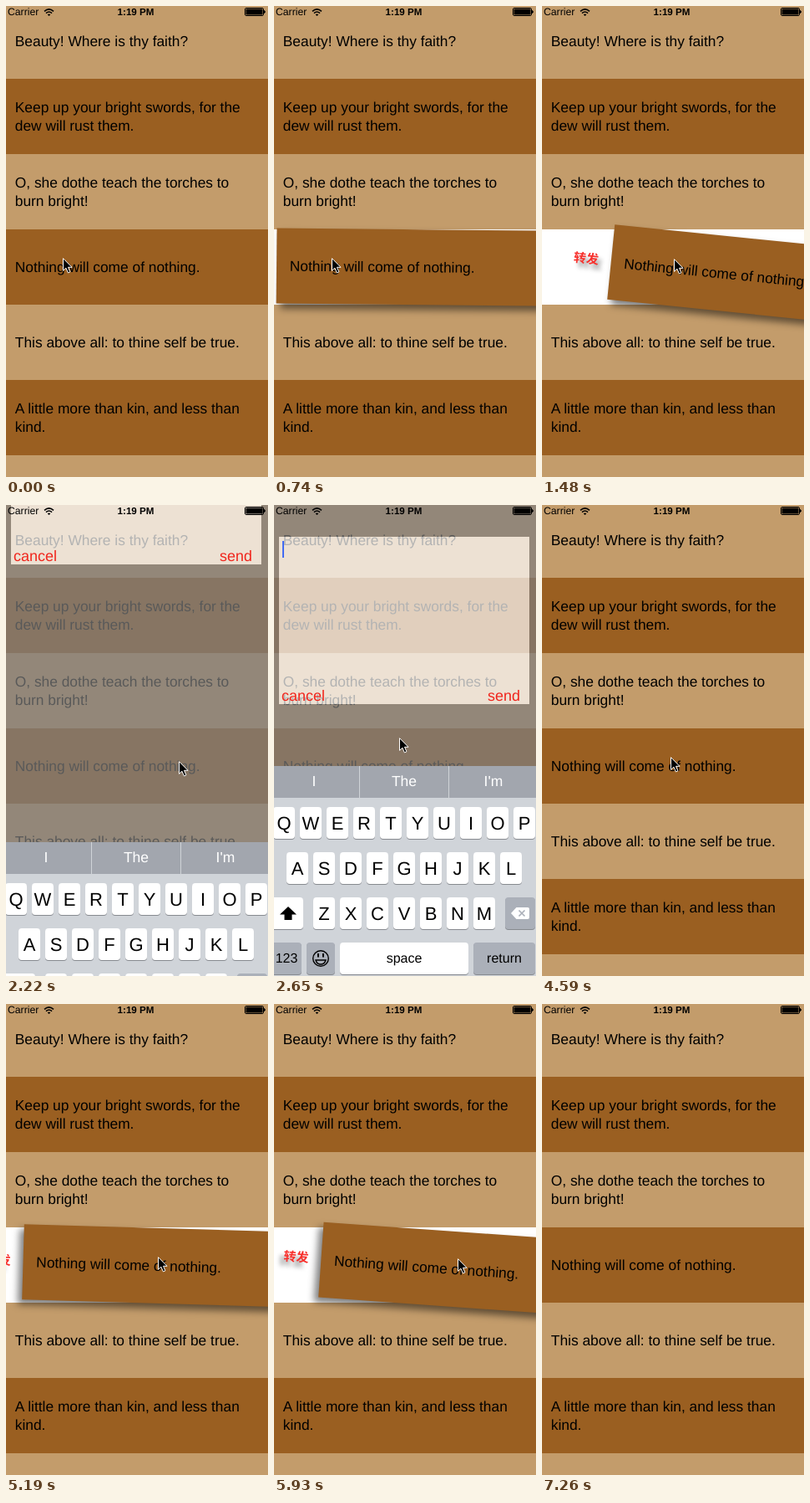
Write an HTML page that moves like this. It is 314 by 563 pixels and loops after 8.22 s.

```html
<!DOCTYPE html>
<html lang="en">
<head>
<meta charset="utf-8">
<title>Swipe a quote to share it</title>
<style>
html, body { margin: 0; width: 100%; height: 100%; overflow: hidden; background: #fff; }
#stage {
  position: relative; width: 314px; height: 563px; overflow: hidden; background: #fff;
  font-family: "Liberation Sans", Arial, sans-serif; color: #000;
  text-rendering: geometricPrecision;
}
#stage div, #stage svg { position: absolute; }
#stage svg { left: 0; top: 0; }
.row {
  left: -5px; width: 320px; height: 90px; box-sizing: border-box; padding-left: 15.8px;
  display: flex; align-items: center; font-size: 17.35px; line-height: 22px; white-space: pre;
  background: #c39c6b;
}
.row.dark { background: #9a5f21; }
#card { z-index: 1; }
#card.lifted { box-shadow: var(--lean) 6px 8px rgba(0, 0, 0, .5); }
#share {
  left: -45px; top: 33px; font: bold 15px/22px "Noto Sans CJK SC", "Noto Sans CJK", sans-serif;
  color: #f8302c; text-shadow: var(--lean) 6px 5px rgba(0, 0, 0, .35);
}
#panel { z-index: 2; left: 6px; top: 0; width: 300px; height: 200px; background: rgba(255, 255, 255, .7); }
#panel .button { bottom: 0; font-size: 18px; line-height: 20px; color: #f0251c; }
#caret { left: 4px; top: 5px; width: 2px; height: 20px; background: #426bf2; }
#keyboard { z-index: 3; left: 0; top: 0; width: 314px; height: 252px; background: #d0d4d9; }
#bar { left: 0; top: 0; width: 314px; height: 38px; background: #a2a6ae; }
.word { top: 0; width: 106px; height: 38px; line-height: 36px; font-size: 17.5px; color: #fff; text-align: center; }
.word + .word { border-left: 1px solid #d0d3d8; }
.key {
  height: 38px; line-height: 39px; border-radius: 4px; background: #fff; font-size: 22px;
  text-align: center; box-shadow: 0 1px 0 #878a8f;
}
.key.small { font-size: 16px; }
.key.gray { background: #abb0b9; }
#status { z-index: 4; left: 0; top: 0; width: 314px; height: 15px; font-size: 12.2px; line-height: 15px; }
#status div { top: 0; }
#status .time { left: 105px; width: 101px; text-align: center; font-weight: bold; font-size: 11.6px; }
#cursor { z-index: 5; overflow: visible; }
</style>
</head>
<body>
<div id="stage">
  <div id="panel">
    <div id="caret"></div>
    <div class="button" style="left:3px">cancel</div>
    <div class="button" style="left:250px">send</div>
  </div>
  <div id="keyboard"><div id="bar"></div></div>
  <div id="status">
    <div style="left:2px">Carrier</div>
    <div class="time">1:19 PM</div>
    <svg width="314" height="15" fill="none" stroke="#000">
      <path d="M46 6.3Q51.5 1.3 57 6.3M48 8.6Q51.5 5.4 55 8.6" stroke-width="1.6"/>
      <path d="M49.7 10.2Q51.5 8.6 53.3 10.2L51.5 12Z" fill="#000" stroke="none"/>
      <rect x="286.5" y="2.5" width="22" height="9" rx="1.5"/>
      <path d="M288 4H307V10H288ZM309.5 5.3Q311.5 7 309.5 8.7Z" fill="#000"/>
    </svg>
  </div>
  <svg id="cursor" width="14" height="20">
    <path d="M.5 .7V15.4L3.9 12.2L6.4 17.9L8.9 16.8L6.5 11.3H11Z" fill="#000" stroke="#fff"/>
  </svg>
</div>
<script>
const LOOP = 8220, TICK = 148.15, LEAD = 9;
const $ = id => document.getElementById(id);

function add(parent, cls, text, style) {
  const el = document.createElement('div');
  el.className = cls;
  el.textContent = text;
  for (const name in style) el.style[name] = style[name] + 'px';
  parent.append(el);
  return el;
}

const quotes = [
  'Beauty! Where is thy faith?',
  'Keep up your bright swords, for the\ndew will rust them.',
  'O, she dothe teach the torches to\nburn bright!',
  'Nothing will come of nothing.',
  'This above all: to thine self be true.',
  'A little more than kin, and less than\nkind.',
  ''
];
quotes.forEach((quote, i) => {
  const row = add($('stage'), i % 2 ? 'row dark' : 'row', quote, { top: 90 * i - 3 });
  if (i === 3) {
    row.id = 'card';
    add(row, '', '转发', {}).id = 'share';
  }
});

const keyboard = $('keyboard');
["I", "The", "I'm"].forEach((word, i) => add($('bar'), 'word', word, { left: 107 * i - 5 }));
const key = (left, top, width, label, cls = '') => add(keyboard, 'key ' + cls, label, { left, top, width });
['QWERTYUIOP', 'ASDFGHJKL', 'ZXCVBNM'].forEach((letters, row) => {
  const left = 143 - 16 * (letters.length - 1) + (row === 2 ? 0 : 0);
  [...letters].forEach((letter, i) => key(left + 32 * i, 49 + 54 * row, 26, letter));
});
key(-3, 157, 38, '');
key(277, 157, 36, '', 'gray');
key(-3, 211, 36, '123', 'small gray');
key(39, 211, 34, '', 'gray');
key(79, 211, 154, 'space', 'small');
key(239, 211, 74, 'return', 'small gray');
keyboard.insertAdjacentHTML('beforeend', `<svg width="314" height="252" fill="none">
  <path d="M17 168L27 177.5H21.5V184H12.5V177.5H7Z" fill="#000"/>
  <path d="M284 176L290.5 169H304Q306 169 306 171V181Q306 183 304 183H290.5Z" fill="#fff"/>
  <path d="M293.5 172.5L300.5 179.5M300.5 172.5L293.5 179.5" stroke="#abb0b9" stroke-width="1.7"/>
  <g stroke="#000" stroke-width="1.4">
    <circle cx="56" cy="230" r="9.3"/>
    <path d="M50 232H62Q60.5 237 56 237T50 232Z"/>
  </g>
  <path d="M53 224V228.5M59 224V228.5" stroke="#000" stroke-width="2"/>
</svg>`);

// Easing over a span of ticks, from 0 to 1.
const span = (tick, from, to) => Math.min(1, Math.max(0, (tick - from) / (to - from)));
const ease = (tick, from, to) => {
  const t = span(tick, from, to);
  return t * t * (3 - 2 * t);
};
const pull = (tick, from, to) => span(tick, from, to) ** 1.9;

// Pointer moves that add up: easing, first tick, last tick, dx, dy.
const moves = [
  [ease, 0, 2, -8, 0],
  [pull, 3, 11, 126, 1],
  [ease, 11, 13, 21, 4],
  [ease, 15, 20, -161, -79],
  [ease, 24, 26, 87, 60],
  [ease, 26, 29, 21, 14],
  [ease, 31, 40, 66, 3]
];

function draw(time) {
  const tick = Math.floor((time % LOOP + LEAD) / TICK);

  const firstSwipe = 112 * pull(tick, 3, 11) * (1 - ease(tick, 11, 14));
  const secondSwipe = 61 * (ease(tick, 31, 40) - ease(tick, 44, 48));
  const d = firstSwipe + secondSwipe;
  const card = $('card');
  card.style.transform = d ? `translate(${d}px, ${d * d * .00135}px) rotate(${d * .0665}deg)` : 'none';
  card.style.setProperty('--lean', firstSwipe ? '5px' : '-5px');
  card.classList.toggle('lifted', d > 0);

  let x = 68, y = 301;
  for (const [easing, from, to, dx, dy] of moves) {
    const part = easing(tick, from, to);
    x += dx * part;
    y += dy * part;
  }
  $('cursor').style.transform = `translate(${Math.round(x)}px, ${Math.round(y)}px)`;
  $('cursor').style.display = tick < 49 ? '' : 'none';

  const typing = ease(tick, 13.2, 16.2) - ease(tick, 26, 29);
  const sheet = ease(tick, 13.4, 17.5) - ease(tick, 24, 26);
  const dim = .7 * (ease(tick, 12, 15) - ease(tick, 26, 29));
  keyboard.style.transform = `translateY(${Math.round(570 - 258 * typing)}px)`;
  $('panel').style.transform = `translateY(${Math.round(269 * sheet - 220)}px)`;
  $('panel').style.boxShadow = `0 0 0 800px rgba(127, 127, 127, ${dim})`;
  $('caret').style.visibility = tick > 15 && tick < 21 ? 'visible' : 'hidden';
}

const start = performance.now();
function loop() {
  draw(performance.now() - start);
  requestAnimationFrame(loop);
}
loop();
</script>
</body>
</html>
```
